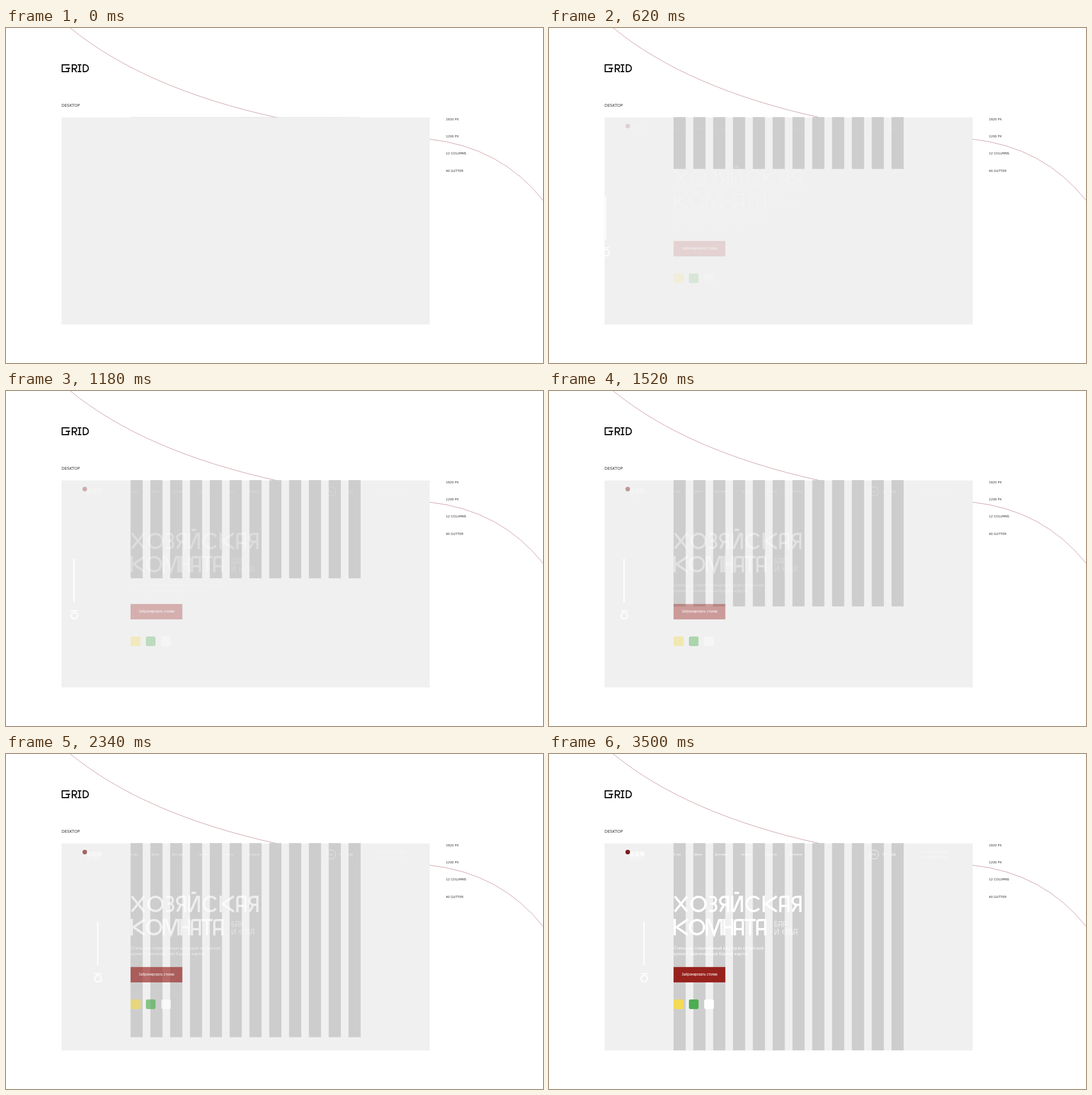
An HTML page for the animation above (3.52 s loop, 948 by 591 pixels).

```html
<!DOCTYPE html>
<html lang="ru">
<head>
<meta charset="utf-8">
<title>Grid</title>
<style>
  html, body { margin: 0; width: 100%; height: 100%; overflow: hidden; background: #fff; }
  svg { display: block; width: 948px; height: 591px; }
  .label { font-family: "DejaVu Sans", sans-serif; font-size: 5.5px; fill: #333; }
  .site { font-family: Inter, "Noto Sans CJK SC", "Noto Sans CJK", sans-serif; fill: #fff; }
  .nav { font-size: 4.8px; }
  .line { fill: none; stroke: #cda2a6; stroke-width: 1; }
  .letters { fill: none; stroke: #fff; }
  .cols { transform-origin: 0 157.2px; animation: grow 3520ms linear infinite; }
  .site { animation: fade 3520ms linear infinite; }
  .marker { animation: slide 3520ms linear infinite; }
  @keyframes grow {
    0% { transform: scaleY(.0022); }
    71.02%, 100% { transform: none; }
  }
  @keyframes fade {
    0%, 3.4% { opacity: 0; }
    99.4%, 100% { opacity: 1; }
  }
  @keyframes slide {
    0% { transform: translateX(-90px); }
    71.02%, 100% { transform: none; }
  }
</style>
</head>
<body>
<svg viewBox="0 0 948 591">
  <path class="line" d="M113 -.5Q243.5 106.5 479 158.2M747 196Q873.5 209.8 948.5 304.5"/>
  <path d="M112 65H99.2V77H110.3V71M105.5 71H113.3M117 78V65H121.3a3.5 3.5 0 0 1 0 7H117M120.8 72L124.5 78M126.5 65H133M129.8 65V77M126.5 77H133M136.5 65H139.4a6 6 0 0 1 0 12H136.5Z"
    fill="none" stroke="#0c0c0c" stroke-width="2" aria-label="GRID"/>
  <text class="label" x="98" y="139.4" style="font-size:7px">DESKTOP</text>
  <g class="label">
    <text x="776.5" y="163.1">1920 PX</text>
    <text x="776.5" y="193.2">1200 PX</text>
    <text x="776.5" y="223.4">12 COLUMNS</text>
    <text x="776.5" y="253.6">40 GUTTER</text>
  </g>

  <rect x="98" y="157.8" width="650" height="365.2" fill="#f0f0f0"/>
  <g class="cols" id="cols" fill="#cdcdcd"></g>

  <g class="marker" fill="none" stroke="#fff">
    <path d="M167.6 296V373" stroke-width="2.2"/>
    <path d="M162 387.6H174.2" stroke-width="1.9"/>
    <circle cx="168.1" cy="396.4" r="5.7" stroke-width="2"/>
  </g>

  <g class="site">
    <text x="142" y="180" font-size="9" font-weight="700">苔雨阁</text>
    <text x="142" y="186.4" font-size="4.2">БАР И ЕДА</text>
    <circle cx="139" cy="173" r="4" fill="#7d1a1a"/>

    <g class="nav" id="nav"></g>
    <circle cx="574" cy="177.3" r="7.9" fill="none" stroke="#fff" stroke-width=".8"/>
    <g font-size="5.2" opacity=".8">
      <text x="655" y="174.8">+7 (000) 000 00 00</text>
      <text x="655" y="184">+7 (000) 000 00 01</text>
    </g>

    <g class="letters" id="title" stroke-width="4"></g>
    <g class="letters" id="tagline" stroke-width="3.4" opacity=".65"></g>

    <g font-size="7.2">
      <text x="219.8" y="344.7">Стильный современный ресторан китайской</text>
      <text x="219.8" y="355.4">кухни с оригинальной барной картой</text>
    </g>

    <rect x="219.9" y="375.8" width="91.4" height="27.1" fill="#97221d"/>
    <text x="265.8" y="391" font-size="5.6" font-weight="500" text-anchor="middle">Забронировать столик</text>

    <rect x="220" y="433" width="17.6" height="17" rx="2" fill="#f5da55"/>
    <rect x="247" y="433" width="17" height="17" rx="3" fill="#4cae50"/>
    <rect x="274" y="433" width="17" height="17" rx="3"/>
  </g>
</svg>
<script>
  const ns = "http://www.w3.org/2000/svg";
  const byId = id => document.getElementById(id);

  function add(parent, tag, attrs, text = "") {
    const el = document.createElementNS(ns, tag);
    for (const key in attrs) el.setAttribute(key, attrs[key]);
    el.textContent = text;
    parent.append(el);
    return el;
  }

  // Each letter: width and centre line, 25 units tall
  const glyphs = {
    А: [14, "M0 27V4Q0 0 4 0H14V27M0 16H14"],
    Б: [12, "M12 0H0V25H6a6 6 0 0 0 0-13H0"],
    Д: [18, "M0 27V19H18V27M3 19V0H15V19"],
    З: [11, "M-1 0H5a6 6 0 0 1 0 12H2M5 12a6.5 6.5 0 0 1 0 13H-1"],
    И: [17, "M0-2V25H3L14 0H17V27"],
    Й: [17, "M0-2V25H3L14 0H17V27M4-7H12"],
    К: [22, "M0-2V27M23-1L3 12.5 23 26"],
    М: [26, "M0 27V0H4L13 25 22 0H26V27"],
    Н: [14, "M0-2V27M0 12.5H14M14-2V27"],
    О: [25, "M0 12.5a12.5 12.5 0 1 1 25 0a12.5 12.5 0 1 1-25 0"],
    Р: [14, "M0 27V0H7a7 7 0 0 1 0 14H0"],
    С: [24, "M23 4.5a12.5 12.5 0 1 0 0 16"],
    Т: [16, "M-2 0H18M8 0V27"],
    Х: [22, "M0-1L22 26M22-1L0 26"],
    Я: [14, "M14 27V0H7a7 7 0 0 0 0 14H14M7 14L0 26"],
    е: [25, "M1 13H25A12.5 12.5 0 1 0 20 22.5"],
    " ": [6, ""]
  };

  function letter(parent, word, x, y, gap, scale = 1) {
    const g = add(parent, "g", {
      transform: `translate(${x} ${y}) scale(${scale})`,
      "aria-label": word
    });
    let pos = 0;
    for (const ch of word) {
      const [width, d] = glyphs[ch];
      add(g, "path", { d, transform: `translate(${pos})` });
      pos += width + gap;
    }
  }

  // 1920 px page scaled to the panel: 1200 px of content, 12 columns, 40 px gutters
  const unit = 650 / 1920;
  const gutter = 40 * unit;
  const colWidth = (1200 * unit - 11 * gutter) / 12;
  for (let i = 0; i < 12; i++) {
    const x = 98 + 360 * unit + i * (colWidth + gutter);
    add(byId("cols"), "rect", { x, y: 157.2, width: colWidth, height: 365.6 });
  }

  const nav = [
    ["О нас", 220], ["Меню", 256.5], ["Доставка", 293], ["Галерея", 339],
    ["Новости", 382], ["Контакты", 425], ["Рус", 569.3], ["En", 589], ["中国", 602.5]
  ];
  for (const [name, x] of nav) add(byId("nav"), "text", { x, y: 179 }, name);

  letter(byId("title"), "ХОЗЯЙСКАЯ", 222, 252, 7.35);
  letter(byId("title"), "КОМНАТА", 222, 293, 4.8);
  letter(byId("tagline"), "БАР", 398.8, 295.7, 8, 0.36);
  letter(byId("tagline"), "И еДА", 398.8, 309.2, 7, 0.36);
</script>
</body>
</html>
```
